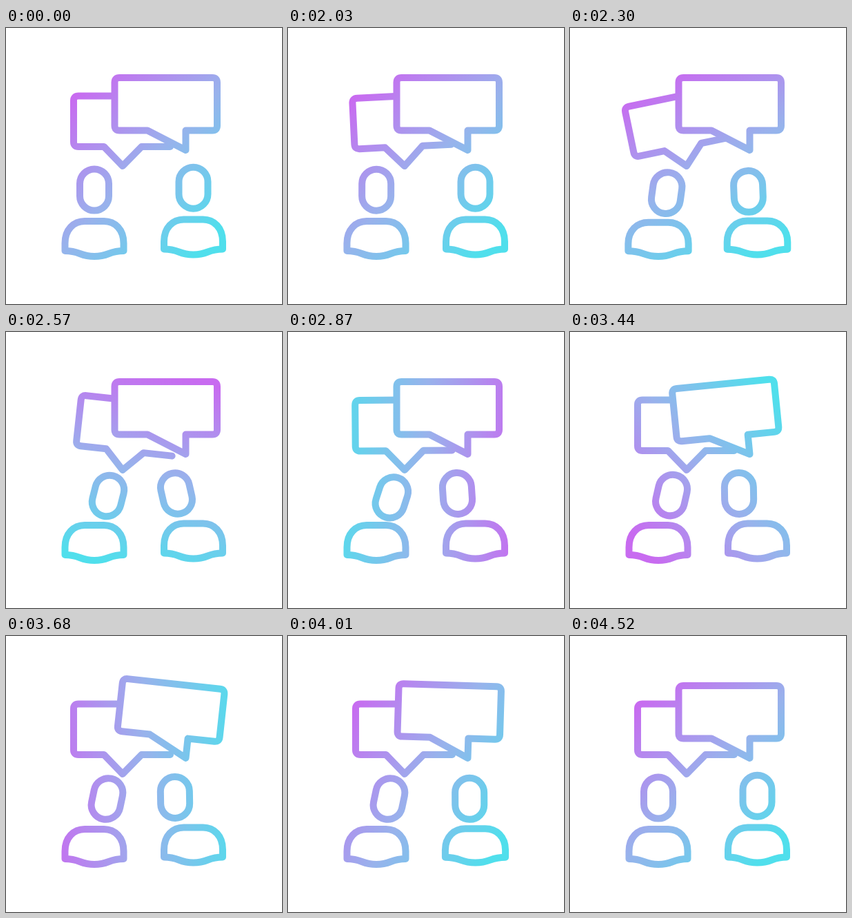
Write an HTML page with a canvas that moves like this. It is 400 px wide and 400 px high and loops after 4550 ms.

```html
<!DOCTYPE html>
<html lang="en">
<head>
<meta charset="utf-8">
<title>Conversation</title>
<style>
  html, body { margin: 0; height: 100%; overflow: hidden; background: #fff; }
  canvas { display: block; width: 100vw; height: 100vh; }
</style>
</head>
<body>
<canvas id="stage" width="400" height="400"></canvas>
<script>
const ctx = document.getElementById('stage').getContext('2d');
const LOOP = 4550;
const MOVE = 500;

const backBubble = new Path2D('M195 98.5H105Q98 98.5 98 105.5V165Q98 172 105 172H142L169 200L196.5 172H238');
const frontBubble = new Path2D('M205 148.5H164.5Q157.5 148.5 157.5 141.5V79Q157.5 72 164.5 72H299Q306 72 306 79V141.5Q306 148.5 299 148.5H260.5V177Z');
const shoulders = new Path2D('M-42.5 323V312C-42.5 292 -30 280 -14 280H14C30 280 42.5 292 42.5 312V323Q31 323 21 327T0 331T-21 327T-42.5 323Z');
const head = new Path2D();
head.roundRect(-21, -30, 42, 60, 21);

const people = [
  {
    x: 128, base: 331, headY: 234.5, leanAt: 2000, returnAt: 4010,
    lean: { x: 18.5, y: 1.5, tilt: 12 },
    nod: { x: 4, y: 4, tilt: 6, at: 2300, time: 1300 }
  },
  {
    x: 271.5, base: 328.5, headY: 231.7, leanAt: 2050, returnAt: 3700,
    lean: { x: -26.5, y: 2.3, tilt: -1 },
    nod: { x: 2, y: 0, tilt: -12, at: 2200, time: 800 }
  }
];

const progress = (t, start, time) => Math.min(1, Math.max(0, (t - start) / time));
const ease = x => (1 - Math.cos(Math.PI * x)) / 2;
const bump = (t, start, time) => Math.sin(Math.PI * progress(t, start, time)) ** 2;

function easeBezier(x, x1, x2) {
  let lo = 0, hi = 1, s;
  for (let i = 0; i < 24; i++) {
    s = (lo + hi) / 2;
    const bx = 3 * (1 - s) ** 2 * s * x1 + 3 * (1 - s) * s * s * x2 + s ** 3;
    if (bx < x) lo = s; else hi = s;
  }
  return s * s * (3 - 2 * s);
}

// Alternating swings, each 5.3 degrees smaller than the last.
function swing(t) {
  const extreme = n => n < 1 || n > 4 ? 0 : (-1) ** n * (25.3 - 5.3 * n);
  const step = (t + 30) / 250, n = Math.floor(step);
  return extreme(n) + (extreme(n + 1) - extreme(n)) * ease(step - n);
}

// Paths are transformed before stroking so the gradient stays fixed to the stage.
function draw(shape, matrix) {
  const path = new Path2D();
  path.addPath(shape, matrix);
  ctx.fill(path);
  ctx.stroke(path);
}

function drawBubble(shape, x, y, angle) {
  draw(shape, new DOMMatrix().translate(x, y).rotate(angle).translate(-x, -y));
}

function drawPerson({ x, base, headY, leanAt, returnAt, lean, nod }, t) {
  const k = ease(progress(t, leanAt, MOVE)) - ease(progress(t, returnAt, MOVE));
  const n = bump(t, nod.at, nod.time);
  const squash = bump(t, leanAt, MOVE) + bump(t, returnAt, MOVE);
  const mix = key => lean[key] * k + nod[key] * n;

  draw(shoulders, new DOMMatrix().translate(x, base)
    .scale(1 + 0.03 * squash, 1 - 0.04 * squash).translate(0, -331));
  draw(head, new DOMMatrix()
    .translate(x + mix('x'), headY + mix('y') + 4 * squash).rotate(mix('tilt')));
}

function gradient(t) {
  const turn = easeBezier(progress(t, 2000, 2500), 0.36, 0.4);
  const angle = Math.PI / 4 + 2 * Math.PI * turn;
  const dx = 143 * Math.cos(angle), dy = 143 * Math.sin(angle);
  const ramp = ctx.createLinearGradient(200 - dx, 200 - dy, 200 + dx, 200 + dy);
  ['#c86bf0', '#98b2ec', '#50dfec'].forEach((color, i) => ramp.addColorStop(i / 2, color));
  return ramp;
}

function render(t) {
  ctx.fillStyle = '#fff';
  ctx.fillRect(0, 0, 400, 400);
  ctx.lineWidth = 10;
  ctx.lineJoin = ctx.lineCap = 'round';
  ctx.strokeStyle = gradient(t);

  drawBubble(backBubble, 169, 200, swing(t - 2000));
  drawBubble(frontBubble, 261, 177, swing(t - 3110));
  ctx.fillStyle = 'transparent';
  people.forEach(person => drawPerson(person, t));
}

const start = performance.now();
function loop() {
  render((performance.now() - start) % LOOP);
  requestAnimationFrame(loop);
}
loop();
</script>
</body>
</html>
```
